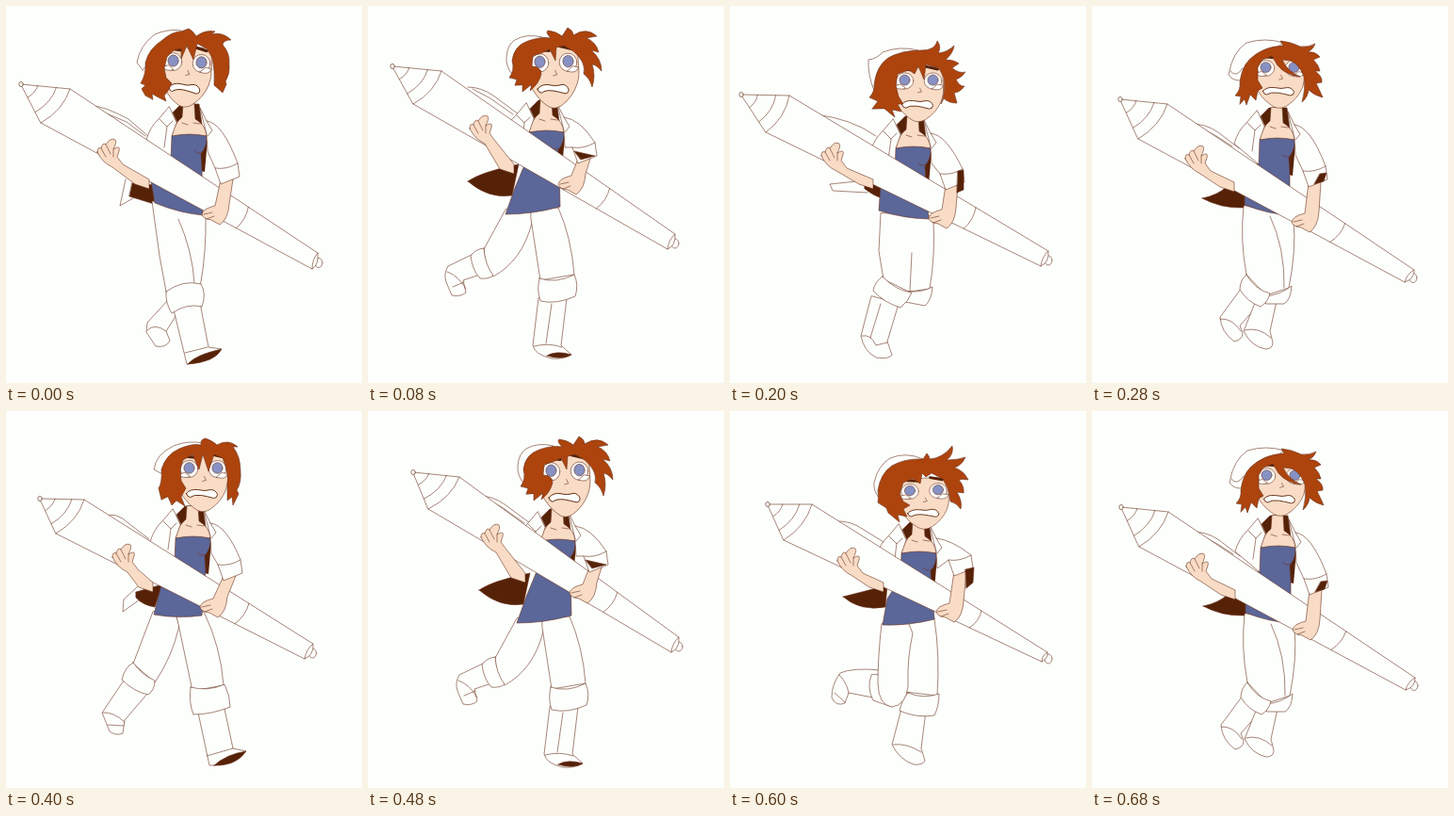
An HTML page with a canvas for the animation above (800 ms loop, 378 px wide and 400 px high).

```html
<!DOCTYPE html>
<html lang="en">
<head>
<meta charset="utf-8">
<title>Walking with a giant pen</title>
<style>
html, body { margin: 0; width: 100%; height: 100%; overflow: hidden; background: #fdfffc; }
canvas { display: block; }
</style>
</head>
<body>
<canvas width="378" height="400"></canvas>
<script>
const g = document.querySelector('canvas').getContext('2d');
const paper = '#fdfffc', ink = '#6b3320', skin = '#f9dcc5', red = '#ad440d',
  blue = '#5b6699', iris = '#8791c4', dark = '#562207', thin = 0.6;

function draw(d, fill, line = ink, width = thin) {
  const p = new Path2D(d);
  if (fill) { g.fillStyle = fill; g.fill(p); }
  if (line) { g.strokeStyle = line; g.lineWidth = width; g.stroke(p); }
}
function oval(x, y, rx, ry, fill, line = ink) {
  g.beginPath();
  g.ellipse(x, y, rx, ry, 0, 0, 7);
  g.fillStyle = fill;
  g.fill();
  if (line) { g.strokeStyle = line; g.lineWidth = thin; g.stroke(); }
}
function at(x, y, paint) {
  g.save();
  g.translate(x, y);
  paint();
  g.restore();
}

// pen: tip, upper and lower shoulder, upper and lower end
// face: eye centre, tilt, chin depth; hem: left, right, slant of the left side
// arm: cuff, hand; hand: palm, elbow
const contact1 = {
  pen: [16, 83, 68, 88, 37, 124, 331, 262, 325, 279],
  face: [192.5, 60, 0.06, 47], chest: [195, 138], hem: [158, 209, 209, 222, -5],
  arm: [234, 184, 222, 222], hand: [110, 157, 152, 192],
  back: 'M92 106 Q104 106 130 120 L152 139 M97 110 L128 123 L148 138',
  tail: 'M127 184 L121 212 L140 201',
  lining: 'M134 188 L158 190 L157 210 L131 202Z',
  hat: 'M145 68 L139 60 Q142 42 158 30 Q172 24 186 26 L178 44 L150 62Z',
  hair: 'M148 95 L144 88 L148 84 L143 82 Q149 72 148 60 Q152 45 165 37 Q176 27 186 27 L194 24 Q198 26 202 32 Q212 25 222 27 L218 30 Q230 27 239 36 Q231 36 230 41 Q238 50 237 62 Q238 72 233 80 L234 83 L230 92 L221 84 Q222 70 219 55 L213 45 L203 40 L199 57 L192 42 L186 56 L186 45 L178 47 L171 54 L168 66 L170 76 L176 82 L172 90 L168 95 L170 101 L160 96 L155 93 L156 99Z',
  legs: ['M172 312 L150 336 L149 346 L159 361 Q170 363 174 355 L170 345 L186 320Z M150 344 Q158 336 170 345',
    'M155 207 L163 265 L170 303 L206 298 Q213 262 212 220Z M183 226 Q198 260 200 294',
    'M177 318 L192 380 Q214 379 229 364 L215 362 L206 315Z M190 368 L214 362',
    'M170 303 Q188 290 207 295 Q213 305 208 319 Q192 315 176 326 Q169 315 170 303Z'],
  sole: 'M193 380 Q201 370 229 364 Q222 378 193 380Z'
};
const pass1 = {
  pen: [12, 94, 63, 95, 38, 134, 338, 260, 330, 276],
  face: [200.5, 79.5, 0, 43], chest: [195, 151], hem: [158, 217, 211, 226, 2],
  arm: [235, 190, 225, 226], hand: [110, 161, 152, 192],
  back: 'M90 115 Q128 119 155 138',
  tail: 'M135 186 L106 189 L109 196 L146 198',
  lining: 'M143 190 L163 188 L161 204 Q152 201 143 194Z',
  cuff: 'M242 175 L248 174 L248 195 L241 198Z',
  hat: 'M153 90 Q146 72 147 57 Q156 56 162 49 Q180 42 200 47 L180 66Z',
  hair: 'M151 109 L157 101 L148 97 Q154 90 153 84 Q155 64 168 55 Q182 47 203 47 Q218 47 220 37 Q225 43 221 50 Q231 49 238 42 Q237 50 229 57 Q238 57 243 61 Q238 64 236 66 Q244 72 250 70 Q246 76 240 78 Q244 86 249 85 Q244 92 238 92 L241 103 Q232 103 227 98 L224 104 Q229 92 227 76 L222 66 L208 62 L206 78 L200 64 L196 72 L190 68 L178 72 L176 84 L179 96 L184 104 L178 104 L182 112 L172 110 L175 118 L164 109Z',
  legs: ['M150 308 L139 350 Q142 366 155 373 Q170 375 172 370 L167 356 L179 316Z M160 316 L149 352 M140 350 Q150 348 155 360 L167 357',
    'M160 220 L158 260 L163 290 L190 303 L212 300 Q218 265 216 228 L211 222Z M193 262 L191 303',
    'M190 303 Q204 304 215 298 Q214 312 207 318 L186 314Z',
    'M162 287 Q154 292 152 302 Q164 315 181 320 Q190 313 193 304 Q176 302 162 287Z']
};
const contact2 = {
  pen: [36, 93, 83, 94, 53, 130, 326, 247, 317, 263],
  face: [209.5, 61.5, 0, 45], chest: [199, 135], hem: [157, 216, 208, 217, 7],
  arm: [237, 175, 220, 209], hand: [126, 157, 156, 190],
  back: 'M105 112 Q116 106 130 119 L152 136 M110 113 L128 123 L146 135',
  tail: 'M140 186 L125 200 L124 213 L142 200',
  lining: 'M138 192 L166 184 L158 208 Q145 206 138 198Z',
  hat: 'M168 68 L157 62 Q159 46 178 37 Q192 31 210 34 L190 52Z',
  hair: 'M165 94 L162 82 Q166 76 165 62 Q170 46 184 40 Q198 34 207 36 Q206 30 212 29 Q220 32 224 36 Q236 29 246 38 L241 38 Q249 48 249 64 Q250 76 245 84 L247 88 L241 100 L240 91 L235 95 L235 78 Q237 66 230 50 L221 46 L215 64 L209 46 L205 62 L198 46 L188 52 L185 62 L186 74 L191 82 L186 91 L190 101 L181 95 L176 100 L172 91Z',
  legs: ['M125 286 L102 320 L110 340 Q117 345 124 342 L126 328 L150 300Z M103 320 Q114 319 126 330 M108 333 L125 334',
    'M156 213 L135 268 L158 288 Q176 262 184 228 L180 213Z',
    'M183 226 L198 297 L231 291 Q228 250 210 213 L180 213Z',
    'M204 320 L216 376 Q240 378 255 361 L241 358 L232 316Z M213 366 L241 358',
    'M135 267 Q126 272 123 285 Q136 298 151 301 Q158 296 158 286 Q144 280 135 267Z',
    'M196 293 Q214 298 232 290 Q238 302 238 314 Q218 322 199 322 Q194 310 196 293Z'],
  sole: 'M221 376 Q234 364 255 361 Q244 377 221 376Z'
};
const down2 = {
  pen: [48, 65, 97, 70, 64, 104, 330, 240, 322, 256],
  face: [209.5, 64, -0.02, 48], chest: [202, 138], hem: [158, 225, 216, 217, 10],
  arm: [241, 166, 228, 194], hand: [133, 136, 167, 180],
  back: 'M118 90 Q132 90 145 99 L172 119 M123 92 L142 102 L166 119',
  lining: 'M118 190 Q132 180 172 172 L165 205 Q140 209 118 190Z',
  cuff: 'M231 158 L253 163 L238 167Z',
  hat: 'M166 78 Q158 68 159 58 Q160 45 168 40 Q180 33 197 37 L190 52Z',
  hair: 'M168 88 L170 82 L162 80 Q168 72 165 62 Q167 46 182 41 Q196 36 206 38 Q200 32 203 30 Q212 31 218 36 L224 27 Q230 30 230 35 Q244 26 255 36 L244 38 Q254 42 257 53 L249 51 Q260 60 260 73 Q254 66 250 66 Q254 78 250 90 Q247 80 241 76 Q244 64 230 52 L220 46 L212 48 L211 62 L205 50 L196 54 L187 57 L186 68 Q195 68 196 76 Q194 86 184 94 L186 87 L176 95 L176 88Z',
  legs: ['M124 267 L97 280 Q92 288 95 297 L101 311 Q110 313 116 308 L113 295 L134 288Z M96 286 Q108 290 116 304 M102 302 L114 297',
    'M158 220 L135 262 Q136 282 145 291 Q176 274 186 234 L186 220Z',
    'M185 230 L195 295 L231 289 Q228 250 214 218 L185 218Z',
    'M193 314 L187 364 Q189 374 207 378 Q220 379 228 374 L217 364 L223 314Z M188 365 Q204 361 218 366 M207 320 L201 362',
    'M135 261 Q126 262 121 269 Q123 285 131 293 Q140 294 145 290 Q136 278 135 261Z',
    'M194 293 Q212 299 231 289 Q236 300 232 312 Q212 321 195 317 Q191 306 194 293Z'],
  sole: 'M202 375 Q212 369 228 374 Q217 380 202 375Z'
};
const pass2 = {
  pen: [40, 99, 87, 99, 57, 137, 337, 256, 331, 266],
  face: [206, 85, -0.03, 40], chest: [201, 151], hem: [162, 227, 217, 221, 5],
  arm: [244, 170, 233, 214], hand: [127, 161, 163, 190],
  back: 'M113 117 Q128 116 142 126 L168 142',
  lining: 'M120 197 Q140 192 167 185 L165 208 Q138 213 120 197Z',
  cuff: 'M250 168 L259 166 L258 182 L251 188Z',
  hat: 'M158 92 Q152 84 153 76 Q157 58 170 50 Q187 43 205 51 L184 68Z',
  hair: 'M157 97 Q158 92 157 84 Q160 66 172 58 Q186 50 205 51 L209 45 Q212 48 212 51 Q226 50 236 37 Q238 46 230 52 Q242 52 250 49 Q246 58 238 60 Q248 63 253 73 Q247 72 243 73 Q249 80 248 87 L241 86 Q247 96 245 104 Q240 97 234 96 L232 84 L226 72 L214 66 L208 70 L204 66 L202 77 L194 72 L184 76 L180 88 L184 96 L191 100 L184 104 L188 112 L178 110 L180 118 L168 108 L166 103Z',
  legs: ['M160 275 Q130 272 117 278 Q108 290 108 304 Q112 314 122 310 L126 299 L162 306Z M116 280 Q124 288 126 299 M111 299 L122 309',
    'M182 316 L172 354 Q180 370 195 375 Q205 376 207 371 L203 358 L208 318Z M173 354 Q188 352 203 362',
    'M188 225 L186 298 L220 302 Q223 260 217 220Z',
    'M189 299 Q205 306 222 300 Q222 313 217 323 Q198 326 180 318 Q183 305 189 299Z',
    'M150 280 Q145 294 152 307 L172 314 L170 280Z',
    'M161 226 Q157 260 157 290 Q158 312 172 314 Q187 312 189 292 Q188 262 194 236 L190 226Z']
};
const up2 = {
  pen: [31, 102, 81, 107, 50, 144, 343, 283, 333, 296],
  face: [200.5, 69, 0, 42], chest: [198, 145], hem: [163, 214, 211, 225, 0],
  arm: [237, 190, 227, 233], hand: [113, 167, 152, 198],
  back: 'M107 128 Q122 128 135 137 L157 154 M112 130 L133 141 L150 152',
  lining: 'M118 207 Q134 204 145 194 L163 196 L163 217 Q138 218 118 207Z',
  cuff: 'M243 181 L250 180 L247 189 L237 192Z',
  hat: 'M157 82 Q150 82 146 76 Q150 52 165 42 Q185 36 204 42 L180 60Z M148 72 Q154 80 161 69',
  hair: 'M158 107 L159 99 L153 98 Q159 92 158 84 Q160 68 168 60 Q182 46 204 45 L201 40 Q212 41 222 46 Q231 47 238 43 Q236 49 230 52 Q238 51 243 57 L236 60 Q242 66 243 72 L238 72 Q246 78 245 84 L239 85 Q243 93 246 100 Q237 98 231 92 Q230 100 224 105 Q228 92 226 78 Q222 66 212 61 L203 60 Q208 72 222 78 Q206 76 198 66 L192 56 L182 60 L177 68 L177 82 L182 90 L177 93 L175 103 L169 97 L165 108 L163 102Z',
  legs: ['M160 302 L137 333 Q138 349 152 359 Q161 357 161 350 L158 342 L178 320Z M137 335 Q150 334 159 348',
    'M174 318 L162 348 Q170 364 185 367 Q193 367 193 360 L190 348 L197 316Z M163 347 Q178 343 191 355',
    'M162 215 Q158 252 165 288 L186 310 L210 302 Q218 262 215 230 L210 223Z M190 226 Q206 260 205 302',
    'M184 311 Q200 310 213 300 Q212 315 205 319 L186 319Z',
    'M165 288 Q158 294 158 304 Q166 317 180 322 Q188 317 190 308 Q174 304 165 288Z']
};
const down1 = { ...down2, shift: [-12, -4], pen: [38, 68, 90, 73, 60, 108, 338, 246, 330, 262] };
const up1 = { ...up2, shift: [-1, -3] };

const poses = [contact1, down1, pass1, up1, contact2, down2, pass2, up2];
const starts = [0, 80, 200, 280, 400, 480, 600, 680];

function pen([tx, ty, ax, ay, bx, by, ex, ey, fx, fy]) {
  const mix = (x, y, u, v, k) => [x + (u - x) * k, y + (v - y) * k];
  const ring = ([x, y], [u, v], bend) =>
    draw(`M${x} ${y} Q${(x + u) / 2 + bend} ${(y + v) / 2 + bend * 0.6} ${u} ${v}`);
  oval((ex + fx) / 2 + 4, (ey + fy) / 2 + 2, 4, 5, paper);
  draw(`M${tx} ${ty} L${ax} ${ay} L${ex} ${ey} Q${ex + 1} ${fy - 4} ${fx} ${fy} L${bx} ${by}Z`, paper);
  for (const k of [0.34, 0.72, 1]) ring(mix(tx, ty, ax, ay, k), mix(tx, ty, bx, by, k), 8 * k);
  ring(mix(ax, ay, ex, ey, 0.72), mix(bx, by, fx, fy, 0.72), 4);
  ring([ex, ey], [fx, fy], -3);
  oval(tx, ty, 2.2, 2.6, paper, dark);
}

function torso([x, y], [lx, ly, rx, ry, slant]) {
  at(x, y, () => {
    draw('M-18 -25 L-9 -34 L10 -34 L13 -12 L17 0 L-10 -8Z', dark);
    draw('M-7 -34 L-8 -20 Q-16 -14 -19 0 L18 0 Q17 -12 6 -18 L5 -34Z', skin);
    draw('M-8 -14 L-2 -12 M4 -14 L11 -13');
    draw('M12 8 L19 4 L16 38 L8 36Z', dark, null);
  });
  draw(`M${x - 19} ${y} Q${x} ${y - 4} ${x + 18} ${y} Q${x + 19} ${y + 10} ${x + 12} ${y + 19} L${x + 13} ${y + 34} L${rx} ${ry}
    Q${(lx + rx) / 2} ${(ly + ry) / 2 + 4} ${lx} ${ly} L${lx + slant} ${ly - 28} L${x - 22} ${y + 30}Z`, blue);
  at(x, y, () => {
    draw('M-22 -31 L-33 -18 Q-42 -10 -46 4 L-20 26 L-19 0 L-14 -14Z', paper);
    draw('M-32 -18 L-24 -10 L-18 -16 M-24 -10 L-27 12');
    draw('M5 16 Q10 20 13 17');
  });
}

function rightArm([ax, ay, hx, hy], [x, y]) {
  draw(`M${ax - 6} ${ay} L${hx} ${hy - 10} Q${hx - 13} ${hy - 7} ${hx - 14} ${hy - 1}
    Q${hx - 13} ${hy + 4} ${hx - 4} ${hy + 5} L${hx + 5} ${hy + 10}
    Q${hx + 14} ${hy + 4} ${hx + 15} ${hy - 12} L${ax + 7} ${ay}Z`, skin);
  at(hx, hy, () => draw('M-12 -1 L-3 -3 M-9 4 L-1 1'));
  draw(`M${x + 11} ${y - 30} L${x + 18} ${y - 16} Q${x + 35} ${y - 14} ${ax + 12} ${ay - 17}
    L${ax + 14} ${ay - 3} L${ax - 6} ${ay + 5} L${ax - 12} ${ay - 12} L${x + 19} ${y + 16} L${x + 18} ${y - 2}Z`, paper);
  draw(`M${ax - 12} ${ay - 12} Q${ax} ${ay - 10} ${ax + 12} ${ay - 17} M${x + 18} ${y - 16} L${x + 24} ${y - 6} L${x + 19} ${y}`);
}

function leftHand([x, y, ex, ey]) {
  at(x, y, () => {
    draw(`M-13 -2 Q-13 -8 -9 -6 Q-7 -13 -4 -10 Q1 -18 6 -15 Q8 -13 4 -5 Q12 -10 10 -3 L8 3 L14 11
      L${ex - x} ${ey - y - 8} L${ex - x} ${ey - y + 2} L${ex - x - 15} ${ey - y - 3} L3 14 Q-8 9 -13 -2Z`, skin);
    draw('M-9 -6 L-4 3 M-4 -10 L1 0 M4 -5 L4 3');
  });
}

function face([x, y, tilt, chin]) {
  at(x, y, () => {
    g.rotate(tilt);
    g.scale(1, chin / 45);
    draw('M-25 -14 L-26 10 Q-26 21 -23 27 Q-15 39 -6 44 Q0 47 7 43 Q19 35 24 22 Q27 14 26 4 L25 -16Z', skin);
    for (const ex of [-15, 15]) {
      oval(ex, 0, 9.3, 9, paper);
      oval(ex, -1, 5.6, 5.8, iris);
    }
    draw('M-27 6 Q-21 11 -14 8 L-19 4Z M14 9 Q24 12 26 5 L20 4Z', paper);
    draw('M-17 -13 L-5 -12 M7 -16 L20 -13', null, dark, 3);
    draw('M1 8 L3 12 L-1 13');
    draw('M-18 26 Q-14 21 -6 22 Q2 24 8 22 Q13 22 15 27 Q15 31 11 31 Q4 29 -2 28 Q-10 27 -14 30 Q-17 30 -18 26Z', paper, dark, 0.9);
  });
}

function figure(p) {
  g.save();
  g.translate(...(p.shift || [0, 0]));
  draw(p.back);
  if (p.tail) draw(p.tail, paper);
  draw(p.lining, dark);
  p.legs.forEach(d => draw(d, paper));
  if (p.sole) draw(p.sole, dark);
  torso(p.chest, p.hem);
  pen(p.pen);
  leftHand(p.hand);
  rightArm(p.arm, p.chest);
  if (p.cuff) draw(p.cuff, dark);
  draw(p.hat, paper);
  face(p.face);
  draw(p.hair, red);
  g.restore();
}

g.lineJoin = g.lineCap = 'round';
function tick(now) {
  const t = now % 800;
  g.fillStyle = paper;
  g.fillRect(0, 0, 378, 400);
  figure(poses[starts.findLastIndex(s => s <= t)]);
  requestAnimationFrame(tick);
}
tick(0);
</script>
</body>
</html>
```
